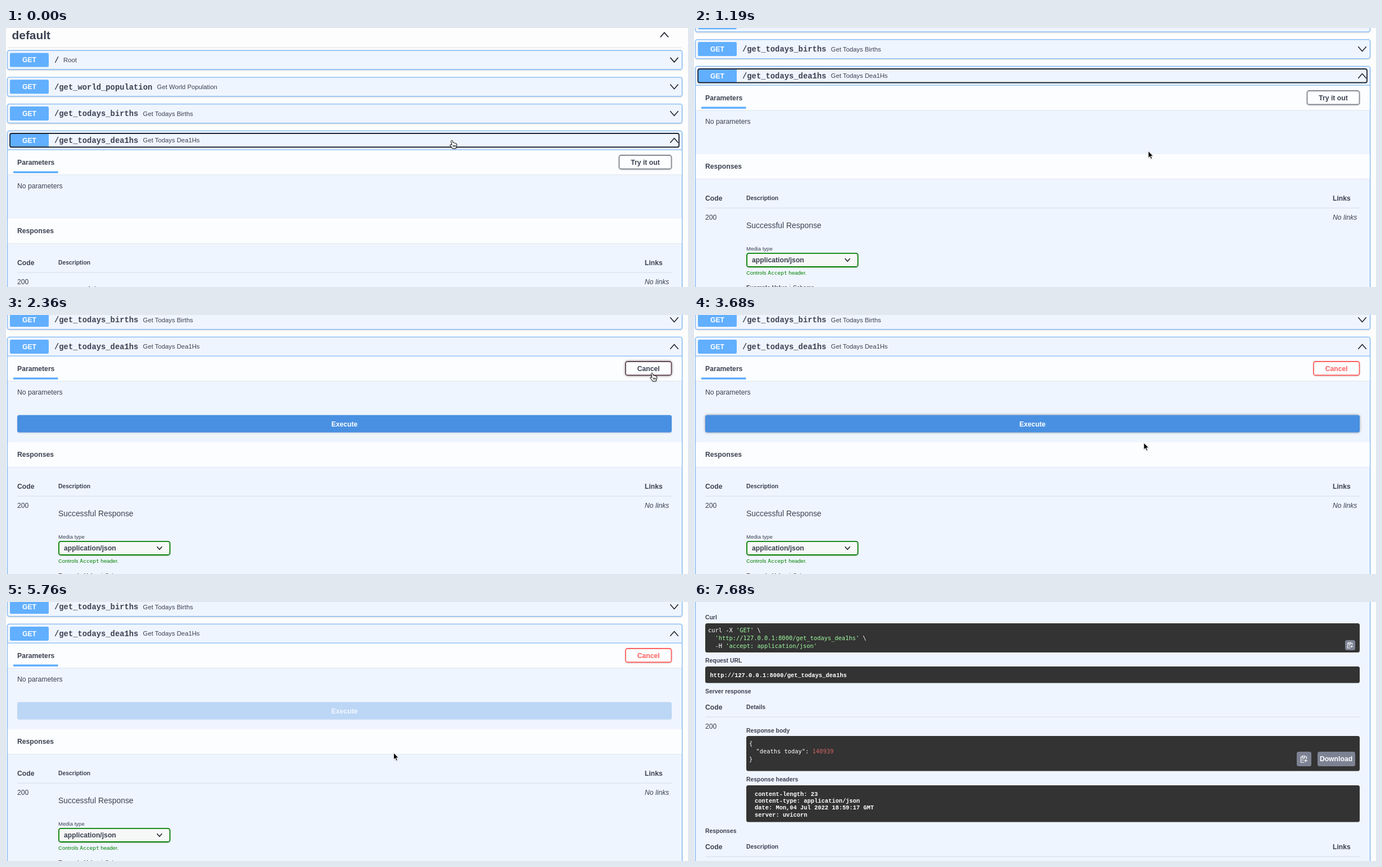
An HTML page for the animation above (8.13 s loop, 1213 by 462 pixels).

```html
<!DOCTYPE html>
<html lang="en">
<head>
<meta charset="utf-8">
<title>API docs</title>
<style>
html, body { margin: 0; width: 100%; height: 100%; overflow: hidden; background: #fdfdfd; }
svg { display: block; width: 1213px; height: 462px; }
text { font-family: "Liberation Sans", Arial, sans-serif; fill: #3b4151; white-space: pre; }
.b { font-weight: 700; }
.i { font-style: italic; }
.w { fill: #fff; }
.c { text-anchor: middle; }
.m { font-family: "Liberation Mono", "Courier New", monospace; }
.d { font-family: "DejaVu Sans Mono", monospace; }
.g { fill: #a2fca2; }
.n { fill: #d36363; }
.ok, .ok tspan { fill: #008000; }
.line { fill: none; stroke: #20242e; stroke-width: 1.6; stroke-linecap: round; stroke-linejoin: round; }
.soft { filter: drop-shadow(0 1px 1px rgba(0,0,0,.15)); }
.deep { filter: drop-shadow(0 0 2px rgba(0,0,0,.4)); }
</style>
</head>
<body>
<svg id="stage" viewBox="0 0 1213 462"></svg>
<script>
const LOOP = 8130, STEP = 147;
const stage = document.getElementById('stage');
const clamp = v => Math.min(1, Math.max(0, v));

// piecewise linear value(s) at n from rows [n, ...values]
function track(n, rows) {
  const i = rows.findIndex(r => r[0] >= n);
  if (i < 0) return rows[rows.length - 1].slice(1);
  if (i === 0) return rows[0].slice(1);
  const a = rows[i - 1], b = rows[i], k = (n - a[0]) / (b[0] - a[0]);
  return a.slice(1).map((v, j) => v + (b[j + 1] - v) * k);
}

// y is the middle of the capitals
const text = (x, y, size, s, cls = '', more = '') =>
  `<text x="${x}" y="${y + size * .35}" font-size="${size}" class="${cls}" ${more}>${s}</text>`;
const rect = (x, y, x2, y2, fill, more = '', r = 3.5) =>
  `<rect x="${x}" y="${y}" width="${x2 - x}" height="${y2 - y}" rx="${r}" fill="${fill}" ${more}/>`;
const path = (d, more = 'class="line"') => `<path d="${d}" ${more}/>`;
const group = (dx, dy, s, more = '') => `<g transform="translate(${dx} ${dy})" ${more}>${s}</g>`;
const chevron = (x, y, dir, w = 6.7) =>
  path(`M${x - w} ${y - dir * w * .58}L${x} ${y + dir * w * .58}L${x + w} ${y - dir * w * .58}`);
const rule = y => rect(20, y, 1184, y + 1, '#d3dce9', '', 0);
const dark = (x, y, x2, y2) => rect(x, y, x2, y2, '#333');

const bar = (y, title) =>
  rect(3, y, 1202, y + 44, '#fcfdfe', '', 0) + rect(3, y + 44, 1202, y + 45, '#dfe6ef', '', 0) +
  text(20, y + 22, 12.2, title, 'b');

function block(i, url, label, bottom) {
  const y = 57 + i * 47.8;
  return rect(2.5, y - 17, 1202.5, bottom || y + 17, '#eff5fe', 'stroke="#7db8f7" stroke-width="1.3" class="soft"') +
    rect(7, y - 12.5, 76, y + 12.5, '#61affe', '', 2.6) +
    text(41.5, y, 12.2, 'GET', 'b w c') +
    text(86, y, 13.83, url, 'b m') +
    text(102 + (url.length - 1) * 8.33 , y, 11.3, label) +
    chevron(1188.5, y, bottom ? -1 : 1);
}

const head = text(10.5, 13, 20.9, 'default', 'b') + chevron(1171, 12, -1) +
  rect(3, 34.5, 1202, 35.5, '#dddfe3', '', 0) +
  block(0, '/', 'Root') +
  block(1, '/get_world_population', 'Get World Population') +
  block(2, '/get_todays_births', 'Get Todays Births') +
  block(3, '/get_todays_dea1hs', 'Get Todays Dea1Hs', 1400) +
  bar(217.5, 'Parameters') + rect(3, 216.6, 1202, 217.8, '#7db8f7', '', 0) +
  rect(13, 255.5, 92.5, 259, '#61affe', '', 0) +
  text(20, 281.5, 12.2, 'No parameters');

const columns = (y, second) => text(20, y, 12.2, 'Code', 'b') + text(93, y, 10.4, second, 'b') + rule(y + 17.3);

const table = columns(418.3, 'Description') + text(1136, 418.3, 12.2, 'Links', 'b') +
  text(20, 452.3, 12.2, '200') + text(1136, 452.3, 12.2, 'No links', 'i') +
  text(93, 467.6, 13.9, 'Successful Response') +
  text(93, 508.3, 9.56, 'Media type') +
  rect(94, 516.8, 291.5, 541, '#f6f7f7', 'stroke="#008000" stroke-width="1.8" class="soft"') +
  text(103, 529, 12.2, 'application/json', 'b') + chevron(273, 529, 1, 4) +
  text(93, 551.6, 9.56, 'Controls <tspan class="d">Accept</tspan> header.', 'ok') +
  text(93, 578, 10.4, 'Example Value', 'b') + text(176, 578, 10.4, 'Schema') +
  rect(170, 572, 171, 584, '#c3c9d3', '', 0) +
  dark(93, 598, 1111.5, 628) + text(98, 609, 10.4, '"string"', 'm b w');

const clip = (x, y, k) => group(x, y, path('M3-4H5V0M-3-4H-5V6H1M-2.500-5.500H2V-3H-2.500ZM-3-1H2M-3 2H0M7 3H2M4 1L2 3L4 5',
  'fill="none" stroke="#fff" stroke-width="1.2"')).replace('translate(', `scale(1) translate(`).replace('<path', `<path transform="scale(${k})"`);
const code = (x, y, s) => text(x, y, 10.4, s, 'd w');
const str = s => `<tspan class="g">'${s}'</tspan>`;
const mono = (x, y, s) => text(x, y, 10.4, s, 'm b w');
const title = (x, y, s) => text(x, y, 10.4, s, 'b');
const api = 'http://127.0.0.1:8000/get_todays_dea1hs';

const result = group(0, 416,
  title(20, 27.3, 'Curl') + dark(20, 38, 1184, 90) +
  code(25, 50.3, `curl -X ${str('GET')} \\`) +
  code(25, 64.2, `  ${str(api)} \\`) +
  code(25, 78, `  -H ${str('accept: application/json')}`) +
  rect(1158, 68, 1176, 86, '#7d8293') + clip(1166.5, 77, .85) +
  title(20, 104.5, 'Request URL') + dark(20, 115, 1184, 144.5) + mono(28.5, 130, api) +
  title(20, 159.5, 'Server response') + columns(187.3, 'Details') +
  text(20, 221.5, 12.2, '200') +
  title(93, 229, 'Response body') + dark(93, 239, 1184, 301.5) +
  code(98, 252, '{') + code(98, 266, '  "deaths today": <tspan class="n">140939</tspan>') + code(98, 280, '}') +
  rect(1072, 267, 1098, 293, '#7d8293') + clip(1084.5, 280, 1) +
  rect(1109, 267, 1176, 293, '#7d8293') + text(1142, 280, 12.2, 'Download', 'b w c') +
  title(93, 316.5, 'Response headers') + dark(93, 327, 1184, 392.5) +
  ['content-length: 23', 'content-type: application/json', 'date: Mon,04 Jul 2022 18:59:17 GMT', 'server: uvicorn']
    .map((s, i) => mono(108, 342.3 + i * 12.2, s)).join('') +
  title(20, 408, 'Responses'));

const arrow = path('M0 0V12.200L2.800 9.600L4.800 14.200L6.800 13.300L4.900 8.900H8.700Z',
  'fill="#000" stroke="#fff" stroke-width=".9" class="soft"');
const hand = path('M-1.500 1.500Q0-1.200 1.300 1.300L2.300 5Q3.800 4 4.300 5.300Q6 4.400 6.500 6Q8.700 5.600 8.800 8C8.900 11 7.600 12 7.300 15H1C0 12.600-1.600 11.600-3.300 9.200Q-3.300 7 0 8.600Z' +
  'M2.300 9V12M4.300 9V12M6.200 9V12', 'fill="#fff" stroke="#000" stroke-width="1" stroke-linejoin="round" class="soft"');
const denied = arrow + '<circle cx="8" cy="18.500" r="7.300" fill="#eee" stroke="#929292" stroke-width="1.500"/>' +
  path('M3.300 13.800L12.700 23.200', 'stroke="#929292" stroke-width="1.500"');

function pointer(n) {
  if (n === 45) return group(1174, 428, arrow);
  if (n > 36) return '';
  const [x, y] = track(n, [[-4, 793, 200], [-3, 802, 212], [-2, 808, 219.5], [4, 808, 219.5], [5, 900, 190], [6, 1060, 130],
    [7, 1149, 103], [12, 1149, 103], [15, 1060, 185], [17, 960, 222], [19, 800, 228], [22, 696, 202], [32, 696, 202], [36, 670, 470]]);
  const onButton = y > 179 && y < 209 && n >= 15;
  const shape = n <= -4 || n >= 7 && n <= 12 || onButton && n < 30 ? hand : onButton ? denied : arrow;
  return group(x, y, shape);
}

function button(x, label, border, ink, cls) {
  return rect(x, 227, 1183.500, 251.500, '#fdfeff', `stroke="${border}" stroke-width="1.800" class="${cls}"`) +
    text((x + 1183.5) / 2, 239.3, 12.2, label, 'b c', `style="fill:${ink}"`);
}

function execute(n) {
  const fade = n >= 43 ? 1 : 1 - .7 * clamp((n - 30) / 2);
  const cls = n >= 15 && n < 32 ? 'deep' : 'soft';
  return `<g opacity="${fade}">` + rect(20, 322.5, 1184, 353.5, '#4990e2', `class="${cls}"`) +
    text(602, 338.3, 12.2, 'Execute', 'b w c') + '</g>';
}

function spinner(n) {
  const turn = 282 + (n - 42) * STEP * .36;
  return group(604, 421, '<circle r="27" fill="none" stroke="#555" stroke-opacity=".1" stroke-width="1.800"/>' +
    path('M-19.100-19.100A27 27 0 0 1 19.100-19.100', `fill="none" stroke="#000" stroke-opacity=".6" stroke-width="1.800" transform="rotate(${turn})"`) +
    text(-2, -1, 8.7, 'LOADING', 'b c'), `opacity="${clamp((n - 36.7) * STEP / 500)}"`);
}

function draw(n) {
  const trying = n >= 10, loading = n >= 38 && n < 43, done = n >= 43;
  const [scroll] = track(n, [[-1, 0], [0, 36], [1, 82], [2, 115], [3, 136], [4, 144], [42, 144], [43, 230], [44, 370], [45, 416]]);
  const shift = loading ? 132 : trying ? 31 : 0;
  const red = k => `color-mix(in srgb, #ff6060 ${100 * k}%, #3b4151)`;
  const k = clamp((n - 10) / 2);
  let page = head;
  if (n < 9) page += rect(7, 188, 1197, 212.5, 'none', 'stroke="#1d2433" stroke-width="1.800"', 3);
  page += trying
    ? button(1102, 'Cancel', red(.2 + .8 * k), red(k), n < 14 ? 'deep' : 'soft') + execute(n)
    : button(1090.500, 'Try it out', '#848891', '#3b4151', n >= 7 ? 'deep' : 'soft');
  if (loading) page += spinner(n);
  page += group(0, shift, bar(340, 'Responses'));
  if (done) page += result;
  page += group(0, done ? 434 : shift, table);
  stage.innerHTML = group(0, -scroll, page) + pointer(n);
}

let shown;
function frame() {
  const n = Math.floor((performance.now() % LOOP - 880) / STEP);
  if (n !== shown) draw(shown = n);
  requestAnimationFrame(frame);
}
frame();
</script>
</body>
</html>
```
